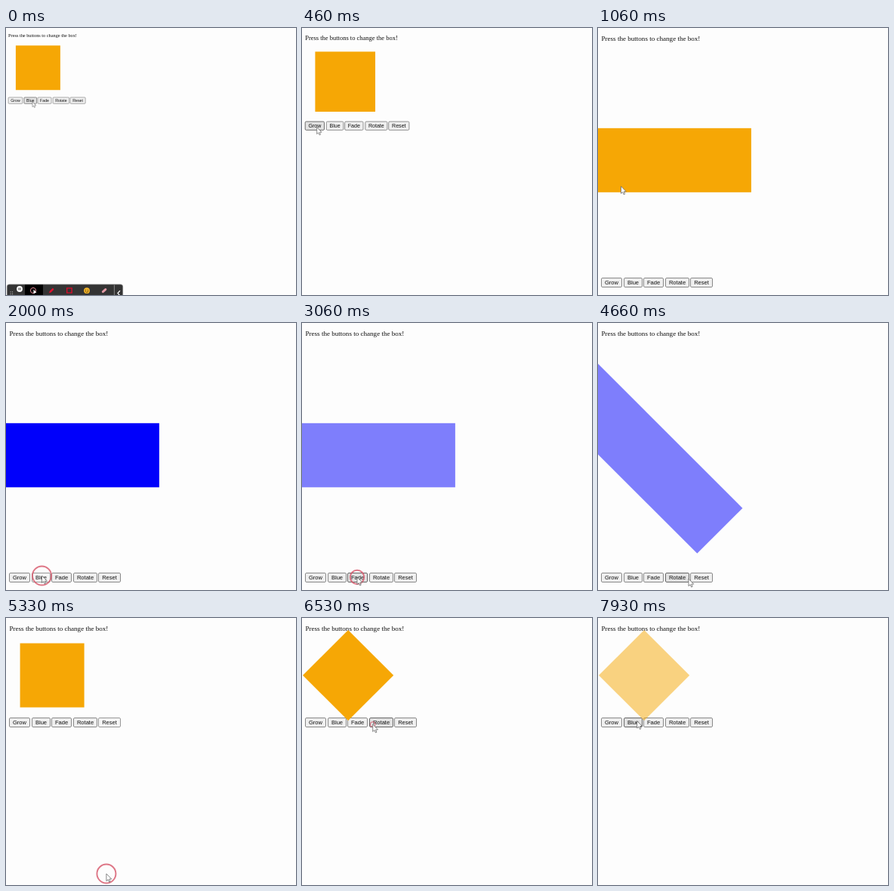
These frames come from a looping animation (384 px wide and 354 px high, 8000 ms). An HTML page with a canvas:

```html
<!DOCTYPE html>
<html lang="en">
<head>
<meta charset="utf-8">
<title>Box buttons</title>
<style>
  html, body { margin: 0; width: 100%; height: 100%; overflow: hidden; background: #fdfdfd; }
  canvas { display: block; width: 384px; height: 354px; }
</style>
</head>
<body>
<canvas id="stage"></canvas>
<script>
const LOOP = 8000;
const W = 384, H = 354;
const START_ZOOM = 0.694;
const ORANGE = '#f6a705', BLUE = '#0000fb';
const SIDE = 85, GROWN = 283.6;
const BOX = { x: 18.6, y: 33.5 };
const BUTTON_Y = 132.5, BUTTON_H = 12;

const buttons = [
  { label: 'Grow', x: 4.5, w: 27 },
  { label: 'Blue', x: 34.5, w: 24 },
  { label: 'Fade', x: 60.5, w: 26 },
  { label: 'Rotate', x: 89.5, w: 31 },
  { label: 'Reset', x: 122.5, w: 29 }
];

// Pointer stops: [time, x, y]
const path = [
  [0, 50.4, 141], [60, 50.4, 141], [400, 21, 140.5], [880, 21, 140.5],
  [1660, 47.5, 335], [2200, 47.5, 335], [2660, 73, 337], [3100, 73, 337],
  [3640, 97.5, 338.5], [4400, 97.5, 338.5], [5000, 133, 339.5], [5330, 133, 339.5],
  [6060, 93.7, 141], [6560, 93.7, 141], [6850, 136, 152], [7150, 74, 141],
  [7560, 74, 141], [7900, 51.7, 136.5]
];

const clicks = [
  [540, 'Grow'], [1930, 'Blue'], [2860, 'Fade'], [4060, 'Rotate'],
  [5265, 'Reset'], [6200, 'Rotate'], [7290, 'Fade']
];
const PRESS = 60;

const actions = {
  Grow: s => { s.height = GROWN; },
  Blue: s => { s.color = BLUE; },
  Fade: s => { s.alpha = 0.5; },
  Rotate: s => { s.angle += 45; },
  Reset: s => Object.assign(s, { height: SIDE, color: ORANGE, alpha: 1, angle: 0 })
};

const canvas = document.getElementById('stage');
const ctx = canvas.getContext('2d');
const dpr = window.devicePixelRatio || 1;
canvas.width = W * dpr;
canvas.height = H * dpr;

const clamp = v => Math.max(0, Math.min(1, v));
const easeOut = p => Math.sin(p * Math.PI / 2);

function zoomAt(t) {
  const p = clamp((t - 20) / 810);
  return START_ZOOM + (1 - START_ZOOM) * (1 - (1 - p) ** 2);
}

function pointerAt(t) {
  const i = path.findIndex(stop => stop[0] > t);
  if (i < 0) return path[path.length - 1].slice(1);
  const [t0, x0, y0] = path[i - 1], [t1, x1, y1] = path[i];
  const p = easeOut((t - t0) / (t1 - t0));
  return [x0 + (x1 - x0) * p, y0 + (y1 - y0) * p];
}

function boxAt(t) {
  const state = { height: SIDE, color: ORANGE, alpha: 1, angle: 90 };
  for (const [time, name] of clicks) {
    if (t >= time + PRESS) actions[name](state);
  }
  return state;
}

function ringRadius(age) {
  if (age < 0 || age > 400) return 0;
  if (age < 60) return 7 + 5.5 * age / 60;
  return 12.5 * (1 - clamp((age - 130) / 270));
}

function shape(fill, stroke, width, build) {
  ctx.beginPath();
  build();
  if (fill) { ctx.fillStyle = fill; ctx.fill(); }
  if (stroke) { ctx.strokeStyle = stroke; ctx.lineWidth = width; ctx.stroke(); }
}

function polyline(points) {
  points.forEach(([x, y], i) => i ? ctx.lineTo(x, y) : ctx.moveTo(x, y));
}

const disc = (x, y, r, fill, stroke, width) =>
  shape(fill, stroke, width, () => ctx.arc(x, y, r, 0, Math.PI * 2));

function drawText(text, x, y, font, color, align) {
  ctx.font = font;
  ctx.fillStyle = color;
  ctx.textAlign = align;
  ctx.fillText(text, x, y);
}

function drawButton({ label, x, w }, y, [px, py], pressed) {
  const hover = px >= x && px <= x + w && py >= y && py <= y + BUTTON_H;
  const fill = pressed ? '#f5f5f5' : hover ? '#e2e2e2' : '#efefef';
  const line = pressed ? '#8d8d8d' : hover ? '#555' : '#7c7c7c';
  shape(fill, line, 0.9, () => ctx.roundRect(x, y, w, BUTTON_H, 1.4));
  drawText(label, x + w / 2, y + 8.7, '7.56px "Liberation Sans", Arial, sans-serif', '#111', 'center');
}

function drawBox({ height, color, alpha, angle }) {
  ctx.save();
  ctx.translate(BOX.x + SIDE / 2, BOX.y + height / 2);
  ctx.rotate(angle * Math.PI / 180);
  ctx.globalAlpha = alpha;
  ctx.fillStyle = color;
  ctx.fillRect(-SIDE / 2, -height / 2, SIDE, height);
  ctx.restore();
}

function drawPointer([x, y]) {
  ctx.save();
  ctx.translate(x, y);
  shape('#fff', '#666', 0.8, () => {
    polyline([[0, 0], [0, 9.6], [2.2, 7.7], [3.7, 11], [5.2, 10.3], [3.8, 7.1], [6.8, 7]]);
    ctx.closePath();
  });
  ctx.restore();
}

function drawToolbar() {
  ctx.save();
  ctx.scale(1 / START_ZOOM, 1 / START_ZOOM);
  shape('#343434', '#777', 0.8, () => ctx.roundRect(1.4, 340, 153.2, 24, 3));
  ctx.fillStyle = '#000';
  ctx.fillRect(25, 340.4, 24, 24);
  ctx.fillStyle = '#bbb';
  for (const x of [5.6, 8]) for (const y of [349.4, 352]) ctx.fillRect(x, y, 1.1, 1.1);
  disc(18, 346, 3.9, '#fff');
  ctx.fillStyle = '#333';
  ctx.fillRect(16.5, 344.5, 1, 3);
  ctx.fillRect(18.5, 344.5, 1, 3);
  disc(36, 348, 3.6, null, '#e58a96', 1);
  shape('#fff', null, 0, () => polyline([[36.5, 346.8], [36.5, 352.2], [40.3, 350.6]]));
  ctx.lineCap = 'round';
  shape(null, '#e0102f', 2.6, () => polyline([[58.8, 349.6], [62, 346.4]]));
  shape(null, '#e0102f', 1, () => polyline([[57.2, 351], [58.8, 349.6]]));
  shape(null, '#d90c2c', 1.4, () => ctx.rect(80.7, 344.9, 6.4, 6.2));
  disc(107, 348.2, 3.9, '#f3b52a');
  disc(105.6, 347.3, 0.6, '#5b3a08');
  disc(108.4, 347.3, 0.6, '#5b3a08');
  shape(null, '#5b3a08', 0.8, () => ctx.arc(107, 348.6, 1.9, 0.2, Math.PI - 0.2));
  shape(null, '#e39aa5', 3, () => polyline([[128.4, 349.7], [131.8, 346.6]]));
  shape(null, '#999', 0.8, () => polyline([[143.4, 341], [143.4, 356]]));
  shape(null, '#fff', 1.3, () => polyline([[150.6, 348.6], [148, 351.6], [150.6, 354.6]]));
  ctx.restore();
}

function draw(t) {
  const pointer = pointerAt(t);
  const box = boxAt(t);
  const zoom = zoomAt(t);
  const click = clicks.find(([time]) => t >= time && t <= time + 400);
  const age = click ? t - click[0] : -1;

  ctx.setTransform(dpr, 0, 0, dpr, 0, 0);
  ctx.fillStyle = '#fdfdfd';
  ctx.fillRect(0, 0, W, H);
  ctx.scale(zoom, zoom);

  drawText('Press the buttons to change the box!', 4.5, 17.2,
    '9.07px "Liberation Serif", "Times New Roman", serif', '#111', 'left');
  const rowY = BUTTON_Y + Math.round(box.height - SIDE);
  for (const b of buttons) {
    drawButton(b, rowY, pointer, click && click[1] === b.label && age < 130);
  }
  drawBox(box);
  drawToolbar();
  const r = ringRadius(age);
  if (r > 0.5) disc(...pointer, r, null, 'rgba(214, 84, 104, 0.8)', Math.min(1.9, r / 3));
  drawPointer(pointer);
}

function tick(now) {
  draw(now % LOOP);
  requestAnimationFrame(tick);
}
draw(0);
requestAnimationFrame(tick);
</script>
</body>
</html>
```
